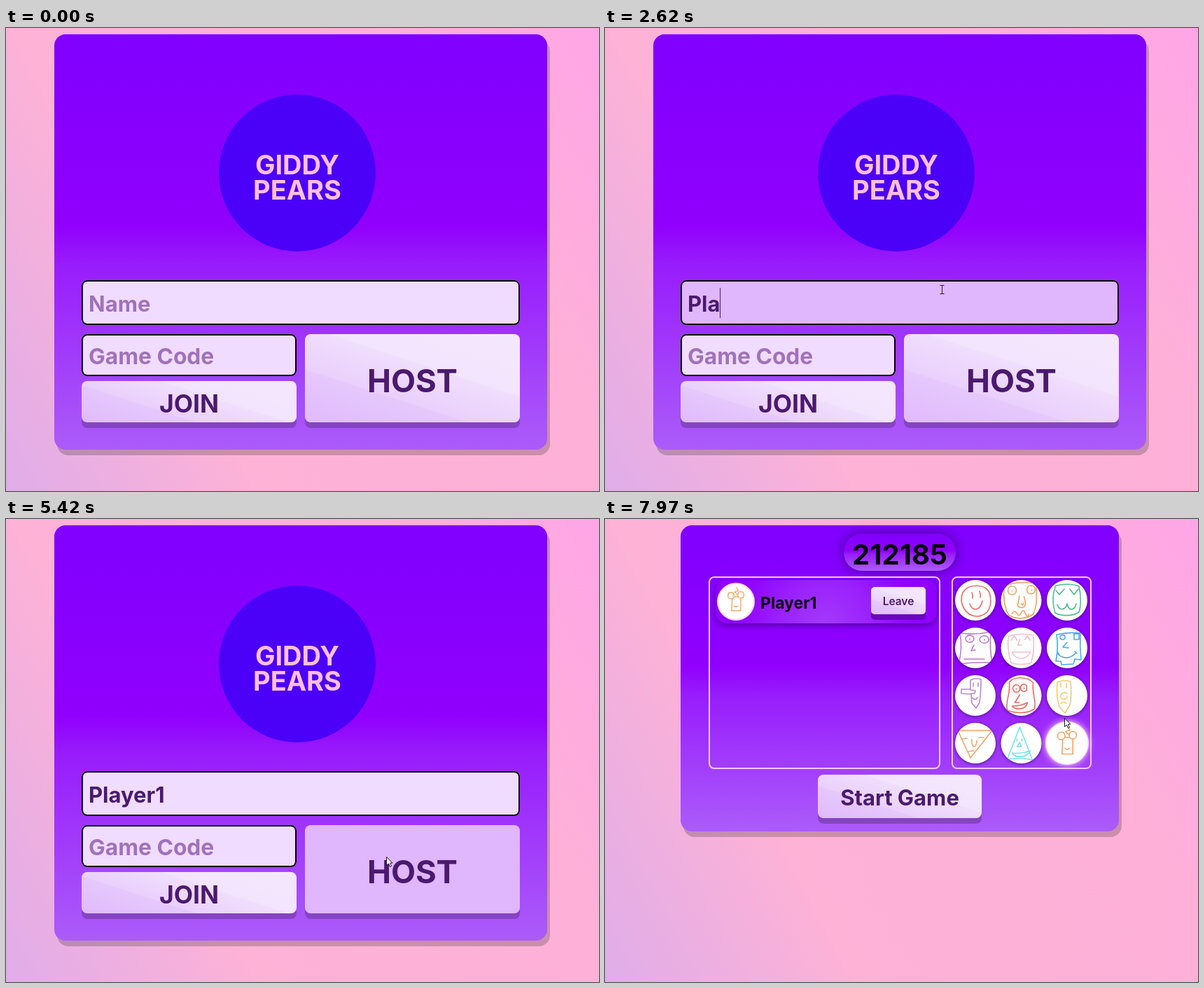
An HTML page with a canvas that plays this animation: 847x661 px, repeating every 8 s.

```html
<!DOCTYPE html>
<html lang="en">
<head>
<meta charset="utf-8">
<title>Game lobby</title>
<style>
html, body { margin: 0; width: 100%; height: 100%; overflow: hidden; }
canvas { display: block; }
</style>
</head>
<body>
<canvas id="stage" width="847" height="661"></canvas>
<script>
const ctx = document.getElementById('stage').getContext('2d');
const W = 847, H = 661, LOOP = 8000, STEP = 1000 / 15;

const INK = '#4a1a6e', FIELD = '#f0dcff', ACTIVE = '#e0b6fd', HINT = '#a072ba';
const PAGE = [[0, '#dfade9'], [0.3, '#fdb2d6'], [0.75, '#feb0d8'], [1, '#ffa5e7']];
const PANEL = [[0, '#8000ff'], [0.46, '#9000fc'], [0.55, '#981cfc'], [1, '#ab5cf9']];
const SHINE = [[0, '#e0bafc'], [0.33, '#e6c8fc'], [0.34, '#ead0fc'],
  [0.6, '#f0defd'], [0.61, '#f3e4fd'], [1, '#f4e8fd']];

const KEYS = [2280, 2550, 2620, 3020, 3150, 3280, 4010];
const FOCUS = 1220, PRESS = 5220, RELEASE = 5360, LOBBY = 5820;
const PICKS = [[0, 0], [6970, 7], [7620, 11]];

// Pointer path: time, x, y
const MOVES = [
  [680, 722, 577], [820, 636, 478], [950, 520, 388], [1020, 482, 354], [1085, 481, 373],
  [4670, 481, 373], [4870, 508, 425], [5080, 543, 482],
  [6370, 543, 482], [6640, 575, 360], [6900, 598, 264], [7200, 600, 256],
  [7500, 650, 318], [7650, 657, 322], [7950, 656, 284]
];

// Doodled faces, drawn around the centre of their circle
const FACES = [
  ['#f4675f', 'M-18-11C-10-24 14-24 20-11C25 6 20 22 3 23C-14 23-24 5-18-11Z' +
    'M-5-11q2 4 1 8M6-13q2 5 1 9M-8 5C-5 16 7 16 10 1'],
  ['#f5a05c', 'M-24-20C-8-27 14-27 22-22C21-6 24 6 17 20C6 28-10 27-18 21C-25 8-26-6-24-20Z' +
    'M-19-14c0-8 12-8 12 0s-12 8-12 0ZM8-15c0-8 12-8 12 0s-12 8-12 0ZM-13-14v1M15-15v1' +
    'M-3-6C-2 3-9 8-2 10C5 12 8 7 4-5M0 5q2 4 3-1M-13 19q4-6 7 0t6-1 6 1 5 1'],
  ['#4dbf8c', 'M-16-21C-4-24 10-23 17-20C20-8 20 8 17 17C8 23-8 23-17 18C-21 6-21-10-16-21Z' +
    'M-16-14l5 6 7-8M4-16l6 8 6-8M-14 6C-11 16-2 14 0 5C3 17 11 14 13 5'],
  ['#bd78cf', 'M-22-21Q0-18 22-23Q20 0 24 21Q0 20-24 23Q-18 0-22-21Z' +
    'M-14-13c1-7 12-6 12 0s-11 7-12 0ZM6-12c1-7 13-7 13 0s-12 7-13 0ZM-8-13v1M13-12v1' +
    'M-2-4l-4 8 6-1M-16 16l29 0'],
  ['#f6bfcd', 'M-18-17Q0-22 17-18Q20 2 14 22Q0 25-14 22Q-21 2-18-17Z' +
    'M-14-11l4-6 4 6M5-12l4-5 4 6M-2-12l-3 8 6 0M-13 6h26Q9 15 0 15Q-10 15-13 6Z'],
  ['#4aabe8', 'M-15-19Q2-23 19-21Q18-2 20 17L11 16 9 23-8 24-9 19-16 19Q-12 0-15-19Z' +
    'M-10-16c2-4 7-3 7 1s-7 5-7-1ZM10-20h7v8h-7ZM0-8l-6 7 8 1' +
    'M-13 9Q0 20 13 7M-14 6l3 4M11 5l3 3'],
  ['#bd85dc', 'M-7-22Q0-26 8-23Q8-4 6 10L1 18-5 11-6-2-20-3-20-9-7-9Z' +
    'M-3-18v5M4-18v5M-7-8L0-7-1-3-6-3M-5 3q5 5 8 0'],
  ['#ee6a62', 'M-17-19C-10-28 10-27 17-18C15-4 22 8 19 19C8 27-10 25-20 21C-23 8-15-2-17-19Z' +
    'M-12-10c1-7 10-7 10 0s-9 7-10 0ZM-1-11c1-7 9-7 9 0s-8 7-9 0ZM-7-10v1M4-11v1' +
    'M-2-1l-7 11 6 0M-13 15Q0 15 9 10Q7 19-2 19Q-9 20-13 15Z'],
  ['#f6c878', 'M-14-19Q-4-23 5-20Q7-4 4 14L-3 25-11 16Q-16 0-14-19Z' +
    'M-9-18v6M-1-17v6M0-3C-9-8-13 5-5 5Q0 6 0 1M-9 11q5-3 8 0'],
  ['#f6a468', 'M-25-18L24-18-7 21ZM-18-6l6-1M5-8h7M-5-5C-6 8 2 8 2-4M-10 12l8-1'],
  ['#76e4ee', 'M-2-23L-20 23Q0 20 16 24ZM-6-6v3M1-6v3M-2-1l-4 6 6 0Z' +
    'M-13 14Q0 16 13 11Q8 20-2 19Q-9 20-13 14Z'],
  ['#f5a565', 'M-13-10c0-7 10-7 10 0s-10 7-10 0ZM3-11c0-7 10-7 10 0s-10 7-10 0Z' +
    'M-6-5L-7 15 8 15 8-5M-3-8h6M1-23l3 5-6 2 4 4M-3 7q3 3 6 0']
].map(([color, d]) => [color, new Path2D(d)]);

function gradient(x, y, w, h, deg, stops) {
  const a = deg * Math.PI / 180, s = Math.sin(a), c = Math.cos(a);
  const half = (Math.abs(w * s) + Math.abs(h * c)) / 2;
  const cx = x + w / 2, cy = y + h / 2;
  const g = ctx.createLinearGradient(cx - s * half, cy + c * half, cx + s * half, cy - c * half);
  stops.forEach(([p, color]) => g.addColorStop(p, color));
  return g;
}

function box(x, y, w, h, r, fill) {
  ctx.beginPath();
  ctx.roundRect(x, y, w, h, r);
  ctx.fillStyle = fill;
  ctx.fill();
}

function frame(x, y, w, h, r, color) {
  ctx.beginPath();
  ctx.roundRect(x + 1, y + 1, w - 2, h - 2, r);
  ctx.lineWidth = 2;
  ctx.strokeStyle = color;
  ctx.stroke();
}

function disc(x, y, r, fill) {
  ctx.beginPath();
  ctx.arc(x, y, r, 0, Math.PI * 2);
  ctx.fillStyle = fill;
  ctx.fill();
}

function withShadow(color, blur, dy, draw) {
  ctx.save();
  ctx.shadowColor = color;
  ctx.shadowBlur = blur;
  ctx.shadowOffsetY = dy;
  draw();
  ctx.restore();
}

function text(str, x, y, size, color, align = 'left', weight = 700) {
  ctx.font = `${weight} ${size}px Inter, sans-serif`;
  ctx.textAlign = align;
  ctx.fillStyle = color;
  ctx.fillText(str, x, y);
  return ctx.measureText(str).width;
}

function panel(x, y, w, h) {
  box(x + 4, y + 8, w, h, 16, 'rgba(0,0,0,.2)');
  box(x, y, w, h, 16, gradient(x, y, w, h, 180, PANEL));
}

function button(x, y, w, h, label, size, base, opt = {}) {
  const { dy = 0, fill, weight = 700, r = 8, under = '#8544c2' } = opt;
  box(x, y + 8, w, h, r, under);
  box(x, y + dy, w, h, r, fill || gradient(x, y, w, h, 18, SHINE));
  text(label, x + w / 2, base + dy, size, INK, 'center', weight);
}

function field(x, y, w, h, fill) {
  box(x, y, w, h, 8, fill);
  frame(x, y, w, h, 7, '#000');
}

function face(i, x, y, scale) {
  const [color, path] = FACES[i];
  ctx.save();
  ctx.translate(x, y);
  ctx.scale(scale, scale);
  ctx.beginPath();
  ctx.arc(0, 0, 29, 0, Math.PI * 2);
  ctx.clip();
  ctx.strokeStyle = color;
  ctx.lineWidth = 1.6;
  ctx.lineCap = ctx.lineJoin = 'round';
  ctx.stroke(path);
  ctx.restore();
}

function pointerAt(t) {
  const q = (Math.floor(t / STEP - 0.15) + 0.27) * STEP;
  let i = 0;
  while (i < MOVES.length - 2 && q >= MOVES[i + 1][0]) i++;
  const [t0, x0, y0] = MOVES[i], [t1, x1, y1] = MOVES[i + 1];
  const k = Math.min(1, Math.max(0, (q - t0) / (t1 - t0)));
  return [x0 + (x1 - x0) * k, y0 + (y1 - y0) * k];
}

const inside = ([px, py], x, y, w, h) => px >= x && px < x + w && py >= y && py < y + h;

function arrow(x, y) {
  ctx.save();
  ctx.translate(Math.round(x) + 0.5, Math.round(y) + 0.5);
  ctx.beginPath();
  [[0, 0], [0, 12], [3, 9.5], [5, 14], [7, 13], [5, 8.7], [8.5, 8.5]]
    .forEach(([a, b]) => ctx.lineTo(a, b));
  ctx.closePath();
  ctx.fillStyle = '#fff';
  ctx.fill();
  ctx.lineWidth = 1;
  ctx.strokeStyle = '#1b1024';
  ctx.stroke();
  ctx.restore();
}

function beam(x, y) {
  x = Math.round(x) + 0.5;
  y = Math.round(y) + 0.5;
  ctx.beginPath();
  ctx.moveTo(x, y - 6);
  ctx.lineTo(x, y + 6);
  for (const e of [-6, 6]) {
    ctx.moveTo(x - 3, y + e);
    ctx.lineTo(x + 3, y + e);
  }
  ctx.lineWidth = 1;
  ctx.strokeStyle = '#2a2030';
  ctx.stroke();
}

function emblem() {
  disc(416, 207, 112, '#4b00f8');
  text('GIDDY', 416, 209, 38, '#ffbfe0', 'center');
  text('PEARS', 416, 245, 38, '#ffbfe0', 'center');
}

function nameField(t) {
  const focused = t >= FOCUS && t < PRESS;
  field(108, 360, 626, 64, !focused ? FIELD : t < 1290 ? '#e8c9fe' : ACTIVE);
  const typed = KEYS.filter(k => t >= k);
  const value = 'Player1'.slice(0, typed.length);
  if (!value) text('Name', 118, 405, 31, HINT);
  const width = text(value, 118, 405, 31, INK);
  const last = typed.length ? typed[typed.length - 1] : FOCUS;
  if (focused && Math.floor((t - last) / 530) % 2 === 0) {
    ctx.fillStyle = INK;
    ctx.fillRect(Math.round(118 + width), 371, 1, 43);
  }
}

function menu(t, ptr) {
  panel(69, 9, 704, 593);
  emblem();
  nameField(t);
  field(108, 437, 307, 60, FIELD);
  text('Game Code', 118, 480, 31.7, HINT);
  button(108, 504, 307, 59, 'JOIN', 35.5, 549);
  const hover = ptr && inside(ptr, 427, 437, 307, 126);
  button(427, 437, 307, 126, 'HOST', 45.5, 520, {
    fill: hover ? ACTIVE : null,
    dy: t >= PRESS && t < RELEASE ? 4 : 0
  });
}

function playerRow(pick) {
  const glow = ctx.createRadialGradient(315, 152, 5, 315, 152, 130);
  glow.addColorStop(0, '#a238fb');
  glow.addColorStop(0.5, '#9a20fc');
  glow.addColorStop(1, '#8f00fd');
  withShadow('rgba(40,0,90,.55)', 9, 3, () => box(158, 87, 316, 62, 16, glow));
  disc(187, 118, 27, '#f6d5f3');
  disc(187, 118, 25, '#fff');
  face(pick, 187, 118, 0.87);
  text('Player1', 222, 128, 23, '#09000f');
  button(380, 97, 78, 39, 'Leave', 15.5, 123, { weight: 600, r: 5, under: '#6a08b8' });
}

function avatars(pick) {
  const order = FACES.map((_, i) => i).sort((a, b) => (a === pick) - (b === pick));
  for (const i of order) {
    const x = 529 + (i % 3) * 65.5, y = 116 + Math.floor(i / 3) * 68;
    if (i === pick) {
      withShadow('#ffd8fa', 10, 0, () => disc(x, y, 31, '#ffdcf6'));
      disc(x, y, 29.5, '#fff');
    } else {
      withShadow('rgba(40,0,90,.65)', 5, 1, () => disc(x, y, 29, '#fff'));
    }
    face(i, x, y, i === pick ? 1.03 : 1);
  }
}

function lobby(t) {
  const pick = PICKS.filter(p => t >= p[0]).pop()[1];
  panel(108, 9, 626, 437);
  withShadow('rgba(30,0,80,.6)', 18, 0, () =>
    box(341, 21, 160, 53, 26, gradient(341, 21, 160, 53, 180, PANEL)));
  text('212185', 421, 65, 40, '#08000e', 'center');
  playerRow(pick);
  frame(148, 82, 331, 275, 7, '#f3c6fa');
  avatars(pick);
  frame(495, 82, 200, 275, 7, '#f3c6fa');
  button(304, 365, 234, 62, 'Start Game', 31, 409);
}

function render(t) {
  ctx.fillStyle = gradient(0, 0, W, H, 62, PAGE);
  ctx.fillRect(0, 0, W, H);
  const ptr = t >= 680 ? pointerAt(t) : null;
  if (t < LOBBY) menu(t, ptr);
  else lobby(t);
  if (!ptr) return;
  const overName = t < LOBBY && inside(ptr, 108, 360, 626, 66);
  (overName ? beam : arrow)(...ptr);
}

const start = performance.now();
function tick() {
  render((performance.now() - start) % LOOP);
  requestAnimationFrame(tick);
}
tick();
</script>
</body>
</html>
```
